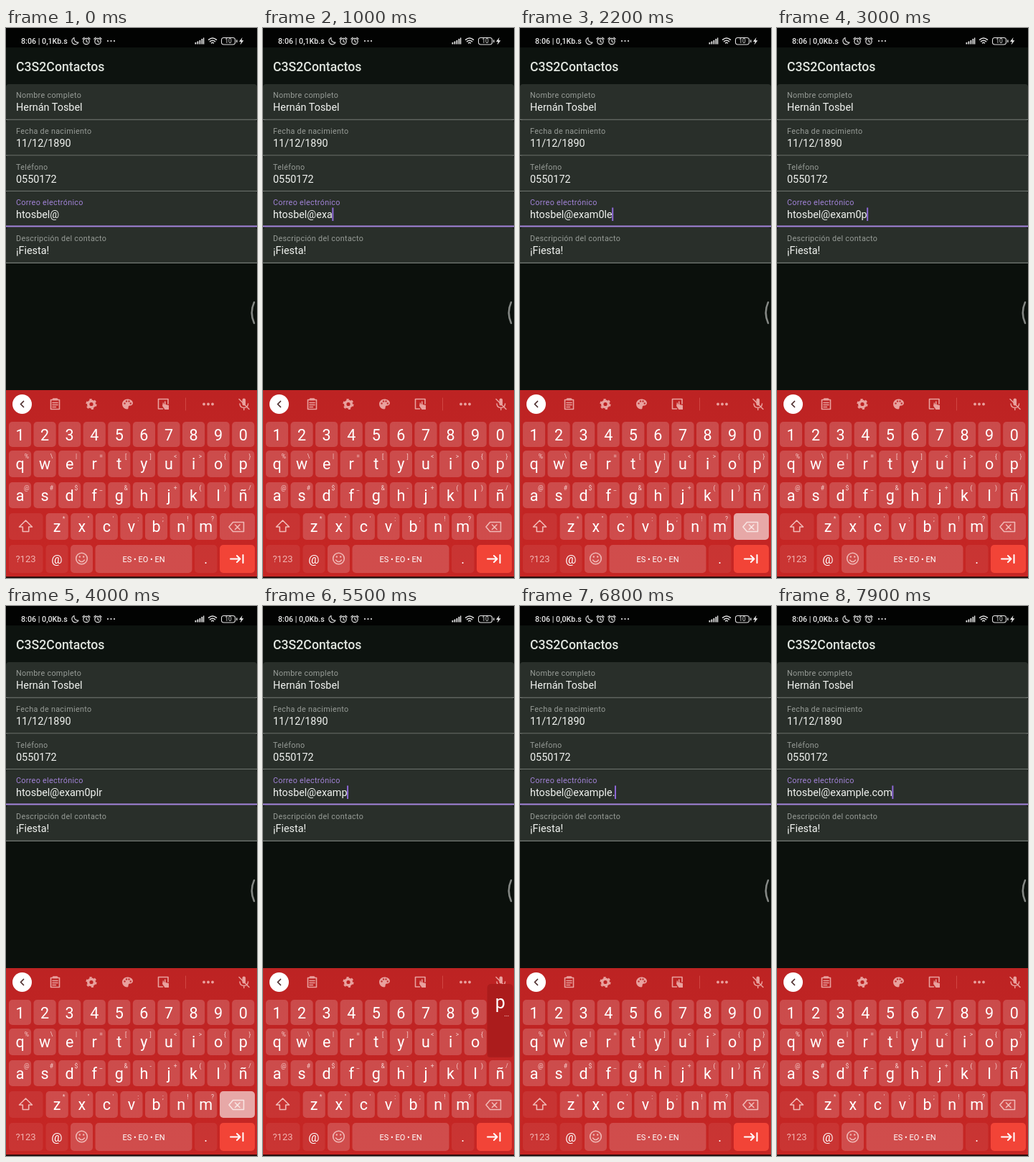
These frames come from a looping animation (350x764 px, 8000 ms). An HTML page:

```html
<!DOCTYPE html>
<html lang="es">
<head>
<meta charset="utf-8">
<title>Contactos</title>
<style>
html, body { margin: 0; width: 100%; height: 100%; overflow: hidden; background: #0b100c; }
svg { display: block; font-family: Roboto, sans-serif; }
text { white-space: pre; }
.label { font-size: 10.8px; letter-spacing: .3px; fill: #979c97; }
.value { font-size: 14.4px; fill: #f1f3f0; }
.focus { fill: #a283d8; }
.key { fill: #fff; fill-opacity: .18; }
.dim { fill-opacity: .07; }
.glyph { font-size: 21.5px; fill: #fff; text-anchor: middle; }
.hint { font-size: 8.5px; fill: #f6d0ce; text-anchor: middle; }
.small { font-size: 13px; fill: #f0b4b1; text-anchor: middle; }
.line { fill: none; stroke-linecap: round; stroke-linejoin: round; }
</style>
</head>
<body>
<svg id="stage" width="350" height="764" viewBox="0 0 350 764">
  <defs>
    <linearGradient id="red" x1="0" y1="0" x2="0" y2="1">
      <stop offset="0" stop-color="#bd2323"/><stop offset="1" stop-color="#c62624"/>
    </linearGradient>
  </defs>
  <rect width="350" height="764" fill="#0b100c"/>
  <rect width="350" height="27" fill="#020302"/>
  <rect y="27" width="350" height="51" fill="#0d130f"/>

  <g fill="#e8e8e8">
    <text id="status" x="21" y="22" font-size="10.7" font-weight="500"></text>
    <g class="line" stroke="#dcdcdc" stroke-width="1.2">
      <path d="M95 13.5A4.8 4.8 0 1 0 101 20A5.2 5.2 0 0 1 95 13.5Z"/>
      <g id="alarm"><circle cx="112" cy="18.5" r="4.2"/><path d="M112 16v2.8l1.8 1M106.8 15.2l2.3-2M117.2 15.2l-2.3-2"/></g>
      <use href="#alarm" x="16"/>
    </g>
    <circle cx="142" cy="18" r="1.1"/><circle cx="146.500" cy="18" r="1.1"/><circle cx="151" cy="18" r="1.1"/>
    <path d="M263.500 20h1.800v2.500h-1.800zM266.500 18.500h1.800v4h-1.800zM269.500 17h1.800v5.500h-1.800zM272.500 15h1.800v7.500h-1.800zM275 13.500h1.300v9h-1.300z"/>
    <g class="line" stroke="#e0e0e0" stroke-width="1.5">
      <path d="M282.500 16.300q5.500-4.600 11 0M284.500 18.700q3.500-2.900 7 0M286.500 20.900q1.500-1.200 3 0"/>
      <rect x="300.500" y="13.500" width="19" height="9.500" rx="3.200" stroke-width="1.1"/>
      <path d="M321.800 17v2.500"/>
    </g>
    <text x="310" y="21.300" font-size="8.500" text-anchor="middle">10</text>
    <path d="M329.500 13l-4.500 6h2.800l-1.200 4.500 4.800-6.300h-2.900z"/>
  </g>
  <text x="14" y="60" font-size="17.7" font-weight="500" fill="#dfe4de">C3S2Contactos</text>

  <g id="form"></g>
  <rect id="caret" y="249.500" width="2" height="18.500" fill="#8d68d6"/>
  <path class="line" d="M346 381Q339.500 395.500 346 410" stroke="#858885" stroke-width="2.500"/>

  <rect y="503" width="350" height="261" fill="url(#red)"/>
  <circle cx="22.500" cy="522.500" r="13.500" fill="#fff"/>
  <path class="line" d="M24.500 518.500l-4 4 4 4" stroke="#4a2a2a" stroke-width="1.700"/>
  <g class="line" stroke="#e9a19e" stroke-width="1.600">
    <path d="M62.500 516.500h12v13h-12zM65 520.500h7M65 523.500h7M65 526.500h4.500"/>
    <path d="M66 515.800h5" stroke-width="3"/>
    <circle cx="119" cy="522.500" r="4.300" stroke-width="3.400"/>
    <circle cx="119" cy="522.500" r="6.500" stroke-width="2.200" stroke-dasharray="3.200 3.607" stroke-linecap="butt"/>
    <path d="M226 522v-6.500h-13.500v13.500h6"/>
    <path d="M250.500 514v17" stroke="#d04643" stroke-width="1"/>
  </g>
  <g fill="#e9a19e">
    <path d="M169 515.500c9.500 0 10 9 4 9-4 0-1 5-4 5a7 7 0 0 1 0-14z"/>
    <path d="M219 519.500l2 4v-5l1.500 0v4.500l4.500 1v6h-5.500l-3.500-5z"/>
    <circle cx="276" cy="522.500" r="1.900"/><circle cx="282" cy="522.500" r="1.900"/><circle cx="288" cy="522.500" r="1.900"/>
    <rect x="329.500" y="514.500" width="4.600" height="10" rx="2.300"/>
  </g>
  <path class="line" d="M326 522q.5 5.500 5.800 5.500t5.800-5.500M331.800 528v2.500M325 515.500l14 14" stroke="#e9a19e" stroke-width="1.500"/>
  <g fill="#c03131"><circle cx="165.500" cy="521.500" r="1.200"/><circle cx="168" cy="518.500" r="1.200"/><circle cx="171.500" cy="518.500" r="1.200"/><circle cx="173.800" cy="521.500" r="1.200"/></g>

  <g id="keys"></g>
  <g class="line" stroke="#f0b9b6" stroke-width="1.600">
    <path d="M27.500 684l-9 9h4.800v6.500h8.400v-6.500h4.800z"/>
    <path id="erase" d="M316.500 686.500h15v13h-15l-5.500-6.500zM319.500 690l6.500 6.500M326 690l-6.500 6.500"/>
    <circle cx="105.500" cy="737" r="7.800"/>
    <path d="M101.500 739q4 5 8 0"/>
    <path d="M102.800 734.500v.2M108.200 734.500v.2" stroke-width="2.300"/>
    <path d="M313 737.500h13M322 733l4.500 4.500-4.500 4.500M330.500 732v11" stroke="#fff" stroke-width="2"/>
  </g>
  <rect y="762" width="350" height="2" fill="#2a0d0c"/>

  <g id="popup">
    <rect x="-18" y="-61" width="36" height="101" rx="4" fill="#8c1515" opacity=".4"/>
    <rect x="-17" y="-62" width="34" height="100" rx="4" fill="#ab1c1c"/>
    <text id="popChar" y="-28" font-size="25" fill="#fff" text-anchor="middle"></text>
    <text x="9" y="-17" font-size="11" fill="#f3cdca" text-anchor="middle">…</text>
  </g>
</svg>
<script>
const LOOP = 8000;
const $ = id => document.getElementById(id);

function add(parent, tag, attrs, text) {
  const el = document.createElementNS('http://www.w3.org/2000/svg', tag);
  for (const name in attrs) el.setAttribute(name, attrs[name]);
  if (text) el.textContent = text;
  return parent.appendChild(el);
}

// Contact form
const USER = 'htosbel@';
const fields = [
  ['Nombre completo', 'Hernán Tosbel'],
  ['Fecha de nacimiento', '11/12/1890'],
  ['Teléfono', '0550172'],
  ['Correo electrónico', USER],
  ['Descripción del contacto', '¡Fiesta!']
];
const values = fields.map(([label, value], i) => {
  const y = 78 + i * 49.75, focus = i === 3;
  add($('form'), 'path', {
    d: `M0 ${y + 49.5}V${y + 4}q0-4 4-4H346q4 0 4 4V${y + 49.5}Z`, fill: '#292f2a'
  });
  add($('form'), 'rect', focus
    ? { y: y + 47.2, width: 350, height: 2, fill: '#a585dc' }
    : { y: y + 48.8, width: 350, height: 1, fill: '#8b908b' });
  add($('form'), 'text', { x: 14, y: y + 19, class: focus ? 'label focus' : 'label' }, label);
  return add($('form'), 'text', { x: 14, y: y + 37, class: 'value' }, value);
});
const email = values[3];

// Keyboard
const spots = {};
function key(x, y, w, h, cls = '') {
  return add($('keys'), 'rect', { x, y, width: w, height: h, rx: 5, class: 'key ' + cls });
}
function row(chars, hints, firstX, y, h) {
  [...chars].forEach((c, i) => {
    const x = firstX + i * 34.58;
    key(x - 15.6, y, 31.2, h);
    add($('keys'), 'text', { x, y: y + 26, class: 'glyph' }, c);
    if (hints) add($('keys'), 'text', { x: x + 9.3, y: y + 10.5, class: 'hint' }, hints[i]);
    spots[c] = [x, y];
  });
}
row('1234567890', '', 19.5, 547, 35);
row('qwertyuiop', '%\\|=[]<>{}', 19.5, 587, 37);
row('asdfghjklñ', '@#$_&-+()/', 19.5, 631, 36);
row('zxcvbnm', '*"\':;!?', 71.2, 674, 37);
key(4, 674, 47.5, 37, 'dim');
const eraseKey = key(298, 674, 49, 37);
key(4, 718, 47.5, 39, 'dim');
key(55.5, 718, 31, 39, 'dim');
key(90, 718, 31, 39);
key(124.500, 718, 135, 39);
key(263, 718, 31.5, 39, 'dim');
add($('keys'), 'rect', { x: 298, y: 718, width: 49, height: 39, rx: 5, fill: '#f24437' });
add($('keys'), 'text', { x: 27.5, y: 742, class: 'small' }, '?123');
add($('keys'), 'text', { x: 71, y: 744, class: 'glyph', style: 'font-size:17px' }, '@');
add($('keys'), 'text', { x: 192, y: 741.5, class: 'small', style: 'font-size:11px;fill:#fff' }, 'ES • EO • EN');
add($('keys'), 'text', { x: 278.5, y: 744, class: 'glyph', style: 'font-size:18px' }, '.');
spots['.'] = [278.5, 718];

// Key taps: time and character, '<' erases
const taps = [
  [300, 'e'], [550, 'x'], [800, 'a'], [1150, 'm'], [1450, '0'], [1700, 'l'], [1900, 'e'],
  [2300, '<'], [2500, '<'], [2850, 'p'], [3150, 'l'], [3400, 'r'],
  [4100, '<'], [4300, '<'], [4500, '<'], [4700, '<'],
  [5400, 'p'], [5750, 'l'], [6050, 'e'], [6500, '.'], [7000, 'c'], [7300, 'o'], [7600, 'm']
];

function draw(t) {
  let text = USER, last = -600, popped = '', erasing = false;
  for (const [at, c] of taps) {
    if (t >= at) {
      text = c === '<' ? text.slice(0, -1) : text + c;
      last = at;
    }
    if (c === '<') erasing = erasing || (t >= at - 150 && t < at + 30);
    else if (t >= at - 50 && t < at + 130) popped = c;
  }
  email.textContent = text;
  $('caret').setAttribute('x', 13.5 + email.getComputedTextLength());
  $('caret').style.display = (t - last) % 1000 < 500 ? '' : 'none';
  $('status').textContent = `8:06 | 0,${t < 2800 ? 1 : 0}Kb.s`;
  eraseKey.style.fillOpacity = erasing ? .6 : '';
  $('erase').style.stroke = erasing ? '#f8e4e2' : '';
  $('popup').style.display = popped ? '' : 'none';
  if (popped) {
    $('popup').setAttribute('transform', `translate(${spots[popped]})`);
    $('popChar').textContent = popped;
  }
}

const start = performance.now();
function tick() {
  draw((performance.now() - start) % LOOP);
  requestAnimationFrame(tick);
}
tick();
</script>
</body>
</html>
```
